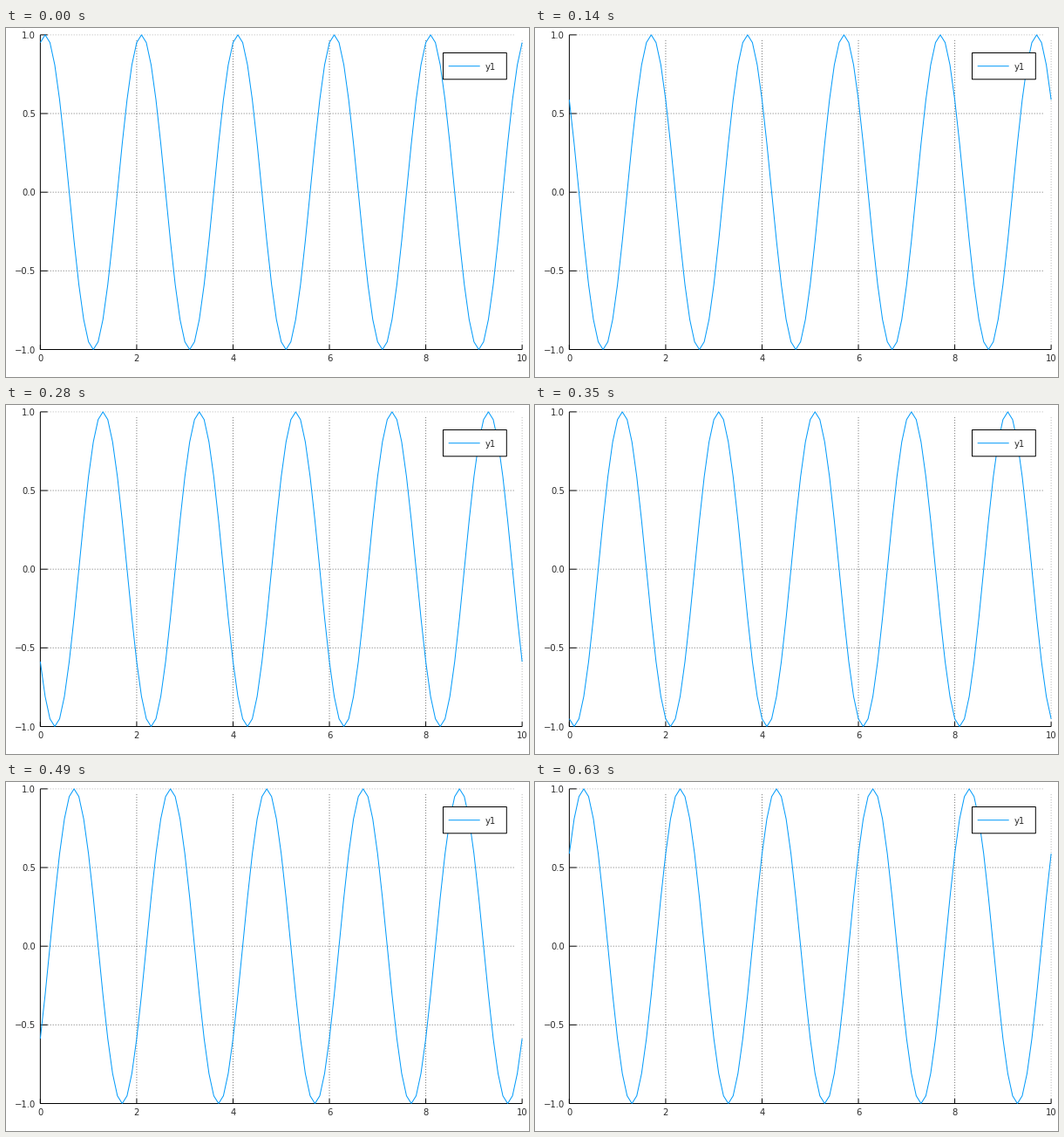
A matplotlib script that plays this animation: 600x400 px, repeating every 700 ms.

```python
import numpy as np
import matplotlib.pyplot as plt
from matplotlib.animation import FuncAnimation
from matplotlib.patches import Rectangle

W, H, DPI = 600, 400, 100
FRAMES, INTERVAL = 10, 70
PX = 72 / DPI   # one pixel in points
MM = DPI / 25.4  # one millimetre in pixels
BLUE, INK = "#009AFA", "#2a2a2a"

# Plot margins of 10, 2, 2 and 8 mm
LEFT, RIGHT = 10 * MM, W - 2 * MM
TOP, BOTTOM = 2 * MM, H - 8 * MM
TICK_X = 0.015 * (RIGHT - LEFT)
TICK_Y = 0.015 * (BOTTOM - TOP)

fig = plt.figure(figsize=(W / DPI, H / DPI), dpi=DPI, facecolor="white")
ax = fig.add_axes([0, 0, 1, 1])
ax.set(xlim=(0, W), ylim=(H, 0))
ax.axis("off")


def to_px(x, y):
    """Map plot values to stage pixels."""
    return (LEFT + (RIGHT - LEFT) * x / 10,
            BOTTOM - (BOTTOM - TOP) * (y + 1) / 2)


def line(xs, ys, color="black", z=2, **kw):
    return ax.plot(xs, ys, color=color, lw=PX, zorder=z, snap=False,
                   solid_capstyle="butt", **kw)[0]


def dotted(xs, ys, edge):
    line(xs, ys, z=1, alpha=0.28 if edge else 0.55,
         ls=(0, (1, 2)), dash_capstyle="butt")


def label(x, y, text, ha, z=2):
    ax.text(x, y, text, ha=ha, va="baseline", family="DejaVu Sans",
            fontsize=10 * PX, color=INK, zorder=z)


# Axes, ticks and grid
line([LEFT, RIGHT], [BOTTOM, BOTTOM])
line([LEFT, LEFT], [TOP, BOTTOM])

for v in range(0, 11, 2):
    x = to_px(v, 0)[0]
    line([x, x], [BOTTOM, BOTTOM - TICK_Y])
    if v:
        dotted([x, x], [BOTTOM - TICK_Y, TOP + TICK_Y], v == 10)
    label(x, 382, str(v), "center")

for v in (-1, -0.5, 0, 0.5, 1):
    y = to_px(0, v)[1]
    line([LEFT, LEFT + TICK_X], [y, y])
    if v > -1:
        dotted([LEFT + TICK_X, RIGHT - TICK_X], [y, y], v == 1)
    label(33.8, y + 4, f"{v:.1f}".replace("-", "\u2212"), "right")

# Legend
ax.add_patch(Rectangle((501.5, 28.5), 72.8, 30.3, fc="white", ec="black",
                       lw=PX, zorder=4, snap=False))
line([507.7, 543.7], [43.7, 43.7], BLUE, z=5)
label(550, 48, "y1", "left", z=5)

# Travelling wave
xs = np.linspace(0, 10, 101)
wave = line([], [], BLUE, z=3, solid_joinstyle="round")


def update(i):
    wave.set_data(*to_px(xs, np.cos(np.pi * (xs - 0.1 + 0.2 * i))))
    return [wave]


anim = FuncAnimation(fig, update, frames=FRAMES, interval=INTERVAL,
                     repeat=True, repeat_delay=0)
plt.show()
```
